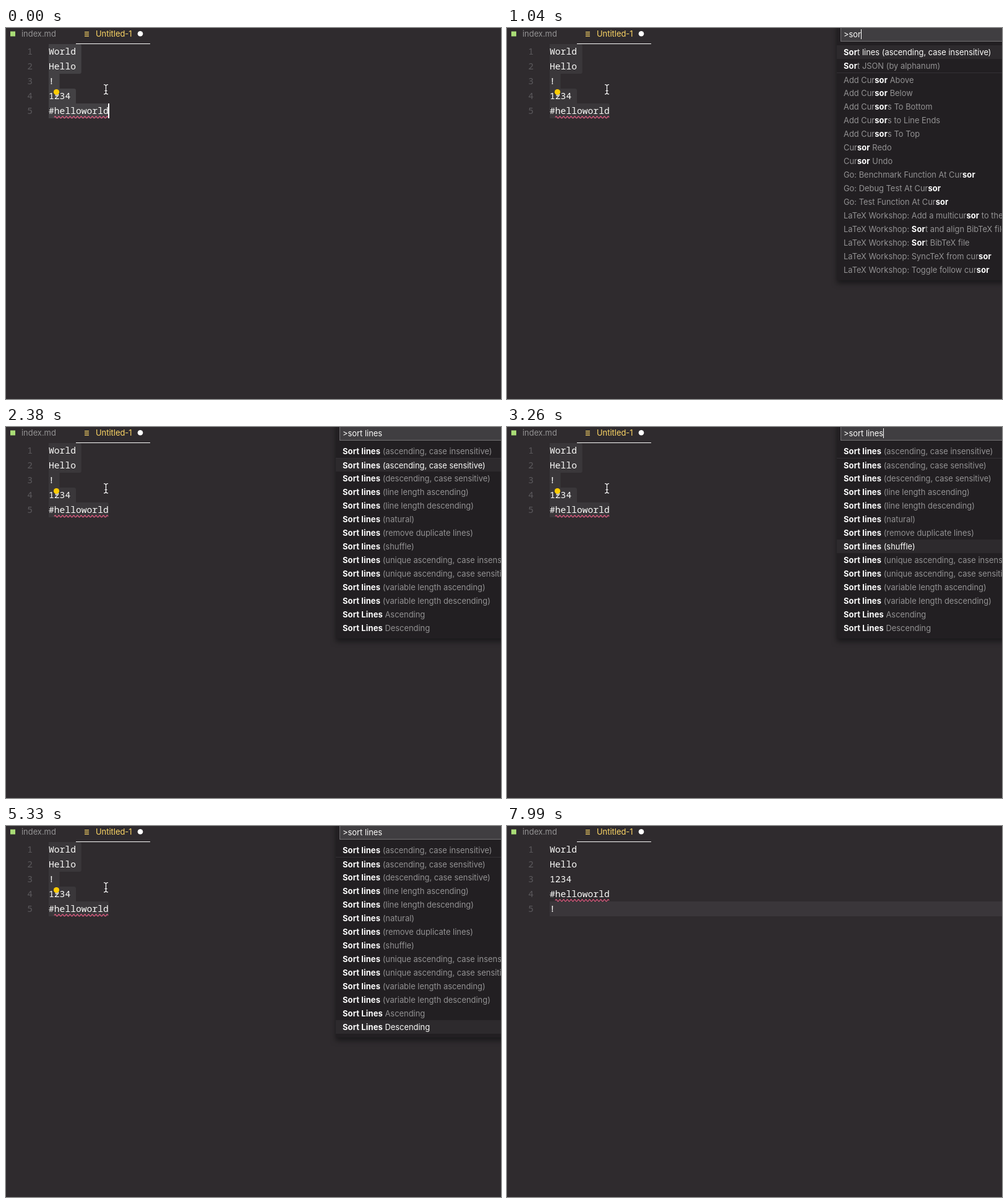
Write an HTML page that moves like this. It is 800x600 px and loops after 8.42 s.

```html
<!DOCTYPE html>
<html lang="en">
<head>
<meta charset="utf-8">
<title>Sorting lines</title>
<style>
  html, body { margin: 0; width: 100%; height: 100%; overflow: hidden; background: #2f2b2e; }
  svg { display: block; }
  text { font: 12.9px Inter, sans-serif; fill: #939293; white-space: pre; }
  .code { font: 500 14.67px "Noto Sans Mono", monospace; fill: #fcfcfa; }
  .number { font-weight: 400; fill: #5b595c; }
  .title { fill: #ffd866; }
  .bold { font-weight: 700; letter-spacing: .15px; fill: #fff; }
  .chosen, .query { fill: #fcfcfa; }
  .palette { filter: drop-shadow(0 5px 4px #19181a); }
</style>
</head>
<body>
<svg id="stage" width="800" height="600" viewBox="0 0 800 600"></svg>
<script>
const LOOP = 8420, CHAR = 8.8, LEFT = 69, LINE = 24, TOP = 26, ROW = 22;
const OPEN = 740, SORTED = 5480, DESELECTED = 6520, POINTER_MOVES = 6960, TICK = 146;
const stage = document.getElementById('stage');

const before = ['World', 'Hello', '!', '1234', '#helloworld'];
const after = ['World', 'Hello', '1234', '#helloworld', '!'];

const queries = [[740, ''], [890, 'so'], [1040, 'sor'], [1180, 'sort'], [1330, 'sort l'],
  [1480, 'sort li'], [1780, 'sort line'], [1930, 'sort lines']];
const moves = [2380, 2530, 2670, 2820, 2970, 3120, 3260, 3410, 3560, 3560, 3850, 4000, 4140];
const editorBlinks = [150, 5480, 5920, 6520, 7100, 7550, 7990];
const inputBlinks = [2380, 2820, 3410, 3850, 4290, 4880, 5330];

const recent = ['Sort lines (ascending, case insensitive)', 'Sort JSON (by alphanum)'];
const latexSorts = ['Sort and align BibTeX file', 'Sort BibTeX file'].map(s => 'LaTeX Workshop: ' + s);
const cursorCommands = [
  ...['Cursor Above', 'Cursor Below', 'Cursors To Bottom', 'Cursors to Line Ends', 'Cursors To Top'].map(s => 'Add ' + s),
  'Cursor Redo', 'Cursor Undo',
  ...['Benchmark Function', 'Debug Test', 'Test Function'].map(s => `Go: ${s} At Cursor`),
  'LaTeX Workshop: Add a multicursor to the current selection',
  ...latexSorts,
  'LaTeX Workshop: SyncTeX from cursor', 'LaTeX Workshop: Toggle follow cursor'];
const lineSorts = [
  ...['ascending, case sensitive', 'descending, case sensitive', 'line length ascending',
    'line length descending', 'natural', 'remove duplicate lines', 'shuffle',
    'unique ascending, case insensitive', 'unique ascending, case sensitive',
    'variable length ascending', 'variable length descending'].map(s => `Sort lines (${s})`),
  'Sort Lines Ascending', 'Sort Lines Descending'];

const passed = (times, t) => times.filter(s => s <= t).length;
const isOn = (blinks, t) => passed(blinks, t) % 2 === 0;
const rect = (x, y, w, h, fill) => `<rect x="${x}" y="${y}" width="${w}" height="${h}" fill="${fill}"/>`;
const text = (x, y, cls, content) => `<text x="${x}" y="${y}" class="${cls}">${content}</text>`;
const stroke = (d, color, width = 1) => `<path d="${d}" fill="none" stroke="${color}" stroke-width="${width}"/>`;

function tabs() {
  return rect(7, 5.5, 8, 8, '#a9dc76') + text(25, 14, '', 'index.md')
    + stroke('M127 6.5h7m-7 2.3h7m-7 2.3h7m-7 2.3h7', '#ffd866')
    + text(145, 14, 'title', 'Untitled-1')
    + '<circle cx="217" cy="9.2" r="4.3" fill="#fff"/>'
    + rect(113, 25, 120, 1, '#fcfcfa');
}

function selection(lines, color) {
  const widths = lines.map((s, i) => (s.length + (i < lines.length - 1 ? 1 : 0)) * CHAR);
  const d = widths.map((w, i) => {
    const a = widths[i - 1] >= w ? 0 : 3, b = widths[i + 1] >= w ? 0 : 3;
    return `M${LEFT} ${TOP + i * LINE}h${w - a}q${a} 0 ${a} ${a}v${LINE - a - b}q0 ${b} ${-b} ${b}H${LEFT}z`;
  }).join('');
  return `<path d="${d}" fill="${color}"/>`;
}

function bulb(line) {
  const y = TOP + line * LINE + 5.5;
  return rect(79.5, y + 3, 4, 4, '#c5c5c5') + `<circle cx="81.5" cy="${y}" r="4.6" fill="#fc0"/>`;
}

function editor(t) {
  const sorted = t >= SORTED, lines = sorted ? after : before;
  const tagLine = lines.indexOf('#helloworld');
  const paletteOpen = t >= OPEN && !sorted;
  let out = t >= DESELECTED
    ? rect(LEFT, TOP + 4 * LINE, 800 - LEFT, LINE, '#3a363a')
    : selection(lines, paletteOpen ? '#3a373a' : '#434144');
  lines.forEach((s, i) => {
    const y = TOP + i * LINE + 17;
    out += text(34.3, y, 'code number', i + 1) + text(LEFT, y, 'code', s);
  });
  if (!sorted || t >= 5770) {
    out += stroke(`M78 ${TOP + tagLine * LINE + 22.4}q1.5 -3 3 0` + 't3 0'.repeat(28), '#fc618d', 1.1);
    if (t < 6810) out += bulb(sorted ? 2 : 3);
  }
  if (isOn(editorBlinks, t)) {
    out += rect(Math.floor(LEFT + lines[4].length * CHAR - .8), TOP + 4 * LINE, 2, LINE, '#fff');
  }
  return out;
}

function pointer(t) {
  const step = Math.max(0, Math.floor((t - POINTER_MOVES) / TICK) + 1);
  if (step > 5) return '';
  const u = (step / 5) ** 1.3, v = 1 - u;
  const curve = (a, b, c) => Math.round(v * v * a + 2 * u * v * b + u * u * c);
  const beam = 'M-3.5 -7.5q3 0 3.5 2q.5 -2 3.5 -2M0 -6V6.5M-3.5 8q3 0 3.5 -2q.5 2 3.5 2M-2 2.5h4';
  return `<g transform="translate(${curve(161, 340, 518) + .5} ${curve(99, 60, 421)})">${stroke(beam, '#fff', 1.2)}</g>`;
}

function highlight(label, query) {
  const at = label.toLowerCase().indexOf(query);
  if (!query || at < 0) return label;
  const end = at + query.length;
  return `${label.slice(0, at)}<tspan class="bold">${label.slice(at, end)}</tspan>${label.slice(end)}`;
}

function palette(t) {
  if (t < OPEN || t >= SORTED) return '';
  const query = queries[passed(queries.map(q => q[0]), t) - 1][1];
  const recents = recent.filter(s => s.toLowerCase().includes(query));
  const rows = [...recents, ...(query.length < 4 ? cursorCommands
    : query === 'sort' ? [...latexSorts, ...lineSorts] : lineSorts)];
  const chosen = passed(moves, t);
  let out = `<g class="palette">${rect(533, -10, 300, rows.length * ROW + 44, '#221f22')}</g>`
    + '<rect x="539.5" y="-5.5" width="300" height="27" fill="#403e41" stroke="#727072"/>'
    + text(544, 15, 'query', '&gt;' + query)
    + rect(533, 28 + chosen * ROW, 267, ROW, '#2d2a2d')
    + rect(533, 28 + recents.length * ROW, 267, 1, '#343135');
  rows.forEach((label, i) => {
    const y = 44 + i * ROW + (i === recents.length ? 1 : 0);
    out += text(544, y, i === chosen ? 'chosen' : '', highlight(label, query));
  });
  if (isOn(inputBlinks, t)) out += '<rect id="caret" y="2" width="1" height="16" fill="#fff"/>';
  return out;
}

let shown = '';
function draw(now) {
  const t = now % LOOP;
  const picture = tabs() + editor(t) + pointer(t) + palette(t);
  if (picture !== shown) {
    stage.innerHTML = shown = picture;
    const caret = stage.querySelector('#caret');
    if (caret) caret.setAttribute('x', Math.round(544 + stage.querySelector('.query').getComputedTextLength()));
  }
  requestAnimationFrame(() => draw(performance.now() - start));
}
const start = performance.now();
draw(0);
</script>
</body>
</html>
```
